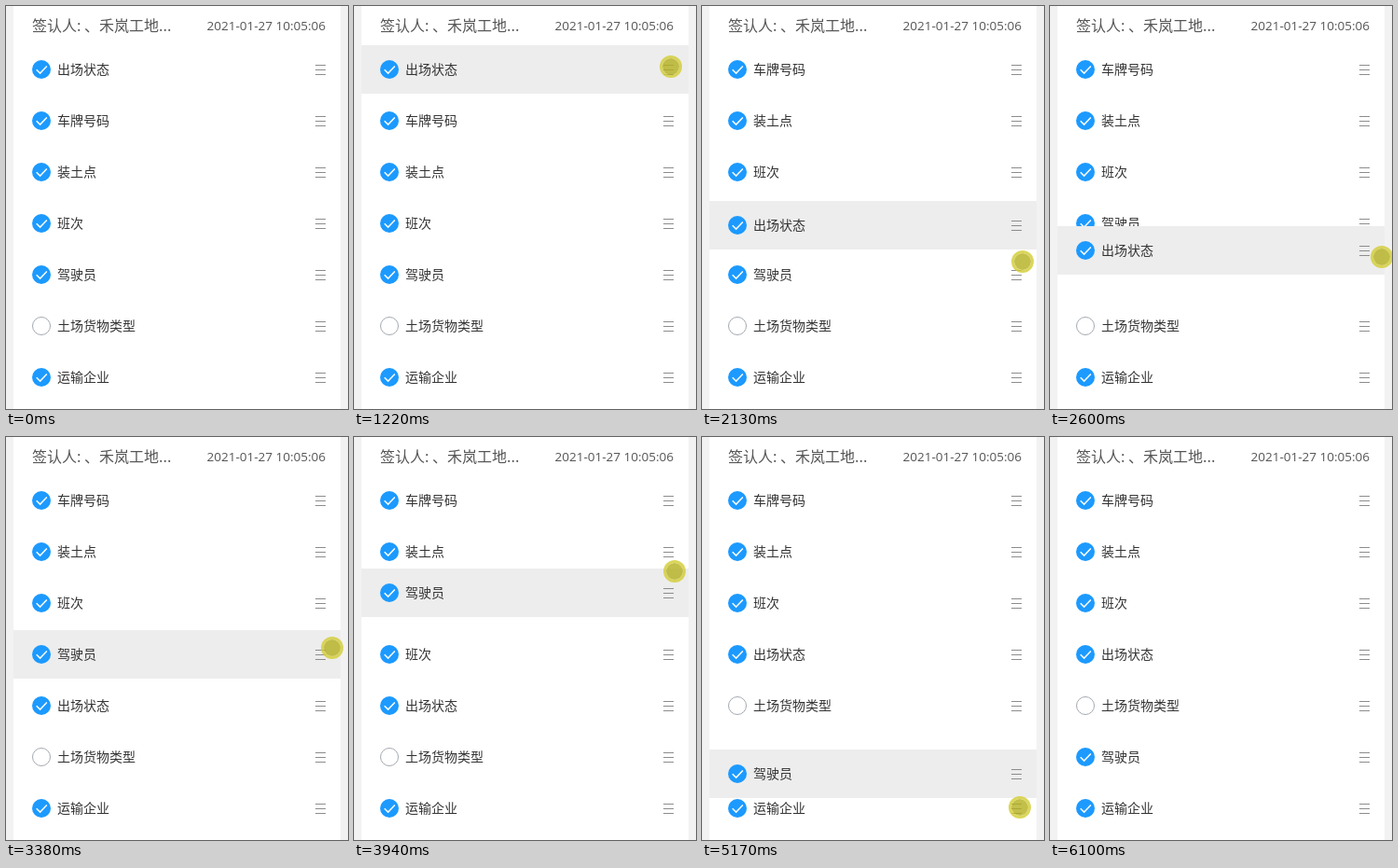
These frames come from a looping animation (367 by 432 pixels, 7.26 s). An HTML page:

```html
<!DOCTYPE html>
<html lang="zh-CN">
<head>
<meta charset="utf-8">
<title>拖动排序</title>
<style>
  html, body { margin: 0; width: 100%; height: 100%; overflow: hidden; background: #f2f2f2; }
  #stage {
    position: relative; width: 367px; height: 432px; overflow: hidden;
    font-family: "Noto Sans CJK SC", "Noto Sans CJK", "Noto Sans CJK JP", sans-serif;
  }
  #panel { position: absolute; left: 8px; top: 0; width: 351px; height: 432px; background: #fff; }
  #head span { position: absolute; top: 0; line-height: 40px; white-space: pre; color: #555; }
  #owner { left: 28px; font-size: 16px; }
  #head #date { right: 24px; top: 1px; font: 13.5px/40px "Open Sans", "Noto Sans", sans-serif; }
  .row { position: absolute; left: 8px; top: -26px; width: 351px; height: 52px; }
  .row span {
    position: absolute; left: 47px; top: -1px;
    font-size: 14px; line-height: 52px; white-space: nowrap; color: #333;
  }
  .row svg { position: absolute; left: 0; top: 0; }
  #pointer {
    position: absolute; left: -12px; top: -12px; width: 24px; height: 24px; z-index: 9;
    box-sizing: border-box; border-radius: 50%;
    border: 3px solid rgba(212, 206, 56, .82);
    background: rgba(179, 175, 29, .8); background-clip: padding-box;
  }
</style>
</head>
<body>
<div id="stage">
  <div id="panel"></div>
  <div id="head">
    <span id="owner">签认人: 、禾岚工地...</span>
    <span id="date">2021-01-27 10:05:06</span>
  </div>
  <div id="pointer"></div>
</div>
<script>
const LOOP = 7260, TICK = 77, GAP = 55, FIRST = 68;
const LOWEST = 389;   // a held row is stopped here
const SWAP = 0.85;    // share of a slot to cross before rows trade places

const labels = ['出场状态', '车牌号码', '装土点', '班次', '驾驶员', '土场货物类型', '运输企业'];
const unchecked = '土场货物类型';
const drags = [
  { label: '出场状态', from: 1140, to: 2920 },
  { label: '驾驶员', from: 3380, to: 5720 }
];

// pointer: time, x, y
const path = [
  [150, 322, 404], [372, 311, 140], [520, 335, 54], [595, 335, 54], [920, 340, 65],
  [1220, 340, 65], [1763, 336, 150], [1840, 336, 150], [2211, 350, 356], [2525, 355, 259],
  [2600, 356, 269], [2690, 357, 240], [2920, 357, 240], [3300, 350, 246], [3380, 350, 226],
  [3713, 347, 226], [3865, 346, 160], [3940, 344, 144], [4173, 345, 86], [4403, 345, 86],
  [4635, 345, 226], [4710, 345, 286], [5093, 342, 354], [5170, 341, 397], [5320, 337, 404],
  [5720, 337, 404], [6100, 382, 409]
];

const slotY = i => FIRST + GAP * i;
const mix = (a, b, p) => a + (b - a) * p;

// Cut the path into ticks of nearly equal length.
function sample(keys) {
  const [, endX, endY] = keys[keys.length - 1];
  const out = [{ t: 0, x: endX, y: endY }];
  keys.forEach((a, i) => {
    const b = keys[i + 1] || a;
    const n = Math.max(1, Math.round((b[0] - a[0]) / TICK));
    for (let j = 0; j < n; j++) {
      const [t, x, y] = a.map((v, k) => mix(v, b[k], j / n));
      out.push({ t, x, y });
    }
  });
  return out;
}

// A held row trails the pointer by one tick; the others close up around it.
function sortRows(ticks) {
  const order = [...labels];
  let active, grab, offset;
  return ticks.map(({ t, y }, i) => {
    const drag = drags.find(d => t >= d.from && t < d.to);
    let heldY;
    if (drag) {
      let slot = order.indexOf(drag.label);
      if (drag !== active) {
        grab = i;
        offset = slotY(slot) - y;
      }
      heldY = Math.min(LOWEST, ticks[Math.max(grab, i - 1)].y + offset);
      const at = (heldY - FIRST) / GAP;
      while (Math.abs(at - slot) > SWAP) {
        const next = slot + Math.sign(at - slot);
        [order[slot], order[next]] = [order[next], order[slot]];
        slot = next;
      }
    }
    active = drag;
    return labels.map(label => {
      const held = !!drag && drag.label === label;
      return { held, y: held ? heldY : slotY(order.indexOf(label)) };
    });
  });
}

const sheet = document.head.appendChild(document.createElement('style'));
function play(el, name, ticks, css) {
  const body = ticks.map((k, i) => `${(k.t / LOOP * 100).toFixed(4)}% { ${css(k, i)} }`);
  sheet.append(`@keyframes ${name} { ${body.join('\n')} }\n`);
  el.style.animation = `${name} ${LOOP}ms step-end infinite`;
}

const stage = document.getElementById('stage');
const ticks = sample(path);
ticks.push({ ...ticks[ticks.length - 1], t: LOOP });
const poses = sortRows(ticks);

play(document.getElementById('pointer'), 'point', ticks,
  ({ x, y }) => `transform: translate(${Math.round(x)}px, ${Math.round(y)}px)`);

const check = `<circle cx="30" cy="26" r="10" fill="#1c9aff"/>
  <path d="M24.7 26.2l3.9 3.9 7.2-7.5" fill="none" stroke="#fff" stroke-width="1.5"/>`;
const ring = '<circle cx="30" cy="26" r="9.5" fill="#fff" stroke="#a3a9b0"/>';
const grip = '<path d="M324 21.5h11m-11 5h11m-11 5h11" stroke="#8c8c8c"/>';

labels.forEach((label, i) => {
  const el = document.createElement('div');
  const mark = label === unchecked ? ring : check;
  el.className = 'row';
  el.innerHTML = `<svg width="351" height="52">${mark}${grip}</svg><span>${label}</span>`;
  stage.append(el);
  play(el, 'row' + i, ticks, (_, k) => {
    const { y, held } = poses[k][i];
    const look = held ? 'z-index: 2; background: #ededed' : 'z-index: 0; background: transparent';
    return `transform: translateY(${Math.round(y)}px); ${look}`;
  });
});
</script>
</body>
</html>
```
